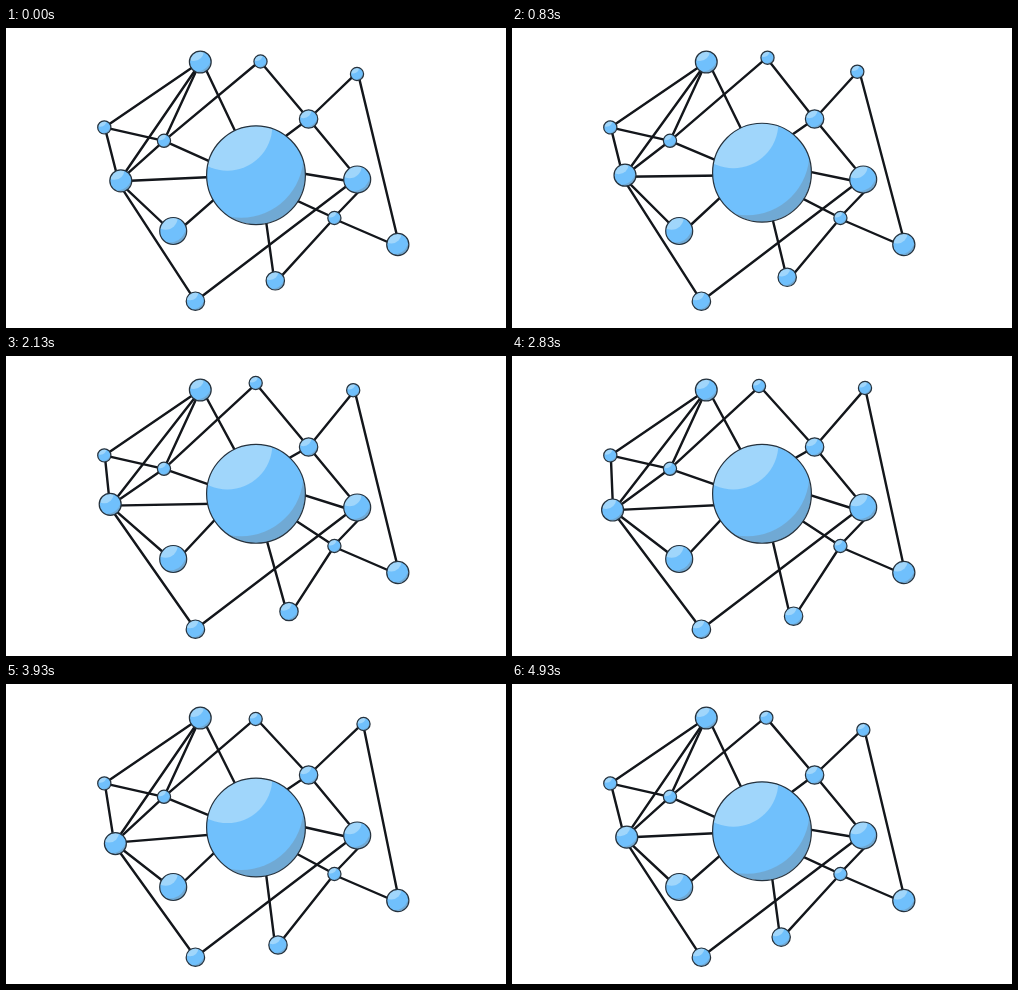
Animation, 500 px wide and 300 px high, one loop 5.01 s. Source, as an HTML page:

```html
<!DOCTYPE html>
<html lang="en">
<head>
<meta charset="utf-8">
<title>Network</title>
<style>
  html, body { margin: 0; width: 100%; height: 100%; overflow: hidden; background: #fff; }
  svg { display: block; width: 500px; height: 300px; }
  line { stroke: #13161b; stroke-width: 2.4; stroke-linecap: round; }
  .rim { fill: none; stroke: #26323d; stroke-width: 1.2; }
</style>
</head>
<body>
<svg id="stage" viewBox="0 0 500 300">
  <defs><clipPath id="disc"><circle r="1"/></clipPath></defs>
  <g id="links"></g>
  <g id="balls"></g>
</svg>
<script>
const LOOP = 5010, STEPS = 100;
const NS = 'http://www.w3.org/2000/svg';

// Resting place and radius of each node
const nodes = {
  a: { x: 194.3, y: 34, r: 10.9 },
  b: { x: 254.5, y: 33.5, r: 6.6 },
  c: { x: 351, y: 46, r: 6.6 },
  d: { x: 98.3, y: 99.4, r: 6.6 },
  e: { x: 158, y: 112.8, r: 6.6 },
  f: { x: 302.6, y: 91, r: 9.2 },
  g: { x: 328.4, y: 190, r: 6.6 },
  h: { x: 391.8, y: 216.5, r: 11.1 },
  l: { x: 114.8, y: 152.8, r: 11 },
  p: { x: 167.2, y: 203, r: 13.5 },
  q: { x: 269.3, y: 252.8, r: 9.2 },
  r: { x: 351.2, y: 151.5, r: 13.5 },
  s: { x: 189.4, y: 273.2, r: 9.2 },
  m: { x: 250, y: 147.2, r: 49.4 },
  hub: { x: 250, y: 147, r: 0 }   // fixed anchor behind the big ball
};

// Closed paths of the drifting nodes, keyed by loop phase.
// Line ends swing about the middle (cx, cy) by a share of the path, with a lead in phase.
const keys = [0, .17, .32, .43, .57, .79];
const drift = {
  b: { x: [254.5, 255.5, 252.7, 249.7, 247, 249.7], y: [33.5, 29.7, 26.9, 27, 30, 35],
       cx: 251, cy: 31, share: .8, lead: 0 },
  c: { x: [351, 345.3, 344.5, 347.2, 353, 357.5], y: [46, 43.7, 38, 34.2, 32, 40],
       cx: 351, cy: 39, share: .8, lead: 0 },
  l: { x: [114.8, 113, 108.5, 104.2, 100.6, 109.4], y: [152.8, 147.2, 145.8, 148.3, 154, 159.6],
       cx: 107.8, cy: 152.8, share: .8, lead: 0 },
  q: { x: [269.3, 275.2, 280.7, 283, 281.6, 272], y: [252.8, 249.3, 251.8, 255.5, 260.2, 261],
       cx: 276, cy: 255, share: 1, lead: .04 }
};

// from, to, then optional offsets at each end
const edges = [
  ['a', 'd'], ['a', 'l', .5, 0, 0, 0], ['a', 'e'], ['a', 'm', 2, 0, -17, -36],
  ['b', 'e'], ['b', 'f'], ['c', 'f'], ['c', 'h', .8, 0, 1.3, 0],
  ['d', 'e'], ['d', 'l', .5, 0, -1, 0], ['e', 'l'], ['e', 'm', 0, 0, 0, 7],
  ['f', 'm', 0, 0, 0, -17], ['f', 'r', 0, 0, -1, -3],
  ['l', 'hub', 0, .4, 0, 0], ['l', 'p', 0, 1.5, 0, 2], ['l', 's', -1, 2, 0, 0],
  ['p', 'm', 5, 0, -30, 14], ['m', 'r', 30, -4.5, -9, 1.5],
  ['m', 'g', 30, 20.5, 0, 0], ['m', 'q', 9.5, 42, -2, 0],
  ['q', 'g', 2, 0, 0, 0], ['g', 'r', 0, -1, 4.5, 9], ['r', 's', 0, -1.5, 0, 0],
  ['g', 'h', 0, 1, -2, 1]
];

function add(parent, tag, attrs) {
  const el = document.createElementNS(NS, tag);
  for (const k in attrs) el.setAttribute(k, attrs[k]);
  return parent.appendChild(el);
}

const links = document.getElementById('links');
const balls = document.getElementById('balls');
const lines = edges.map(() => add(links, 'line', {}));

for (const n of Object.values(nodes)) {
  if (!n.r) continue;
  n.el = add(balls, 'g', {});
  const body = add(n.el, 'g', { transform: `scale(${n.r})`, 'clip-path': 'url(#disc)' });
  add(body, 'circle', { r: 1, fill: '#70a9d4' });
  add(body, 'circle', { cx: -.3, cy: -.4, r: 1.26, fill: '#70c0fc' });
  add(body, 'circle', { cx: -.58, cy: -1, r: .91, fill: '#a0d6fb' });
  add(n.el, 'circle', { r: n.r, class: 'rim' });
}

// Periodic cubic through the keyed values
function loopCurve(v, phase) {
  const p = phase % 1, n = keys.length;
  const time = i => keys[(i + n) % n] + Math.floor(i / n);
  const val = i => v[(i + n) % n];
  const rate = i => (val(i + 1) - val(i)) / (time(i + 1) - time(i));
  const slope = i => {
    const before = time(i) - time(i - 1), after = time(i + 1) - time(i);
    return (rate(i - 1) * after + rate(i) * before) / (before + after);
  };
  let i = n - 1;
  while (keys[i] > p) i--;
  const h = time(i + 1) - time(i), u = (p - time(i)) / h, w = 1 - u;
  return val(i) * (1 + 2 * u) * w * w + val(i + 1) * u * u * (3 - 2 * u)
       + h * u * w * (slope(i) * w - slope(i + 1) * u);
}

// The picture holds for 30 ms and 70 ms in turn
function phaseAt(ms) {
  const step = 2 * Math.floor(ms / 100) + (ms % 100 >= 30 ? 1 : 0);
  return Math.min(step, STEPS - 1) / STEPS;
}

// Where lines meet a node
function tie(name, p) {
  const d = drift[name];
  if (!d) return nodes[name];
  return {
    x: d.cx + d.share * (loopCurve(d.x, p + d.lead) - d.cx),
    y: d.cy + d.share * (loopCurve(d.y, p + d.lead) - d.cy)
  };
}

function draw(ms) {
  const p = phaseAt(ms % LOOP);
  for (const k in drift) {
    nodes[k].x = loopCurve(drift[k].x, p);
    nodes[k].y = loopCurve(drift[k].y, p);
  }
  nodes.m.y = 142.3 + 4.9 * Math.cos(2 * Math.PI * p);

  edges.forEach(([from, to, ax = 0, ay = 0, bx = 0, by = 0], i) => {
    const a = tie(from, p), b = tie(to, p), el = lines[i];
    el.setAttribute('x1', a.x + ax);
    el.setAttribute('y1', a.y + ay);
    el.setAttribute('x2', b.x + bx);
    el.setAttribute('y2', b.y + by);
  });
  for (const n of Object.values(nodes)) {
    if (n.el) n.el.setAttribute('transform', `translate(${n.x} ${n.y})`);
  }
}

const start = performance.now();
function tick() {
  draw(performance.now() - start);
  requestAnimationFrame(tick);
}
draw(0);
requestAnimationFrame(tick);
</script>
</body>
</html>
```
